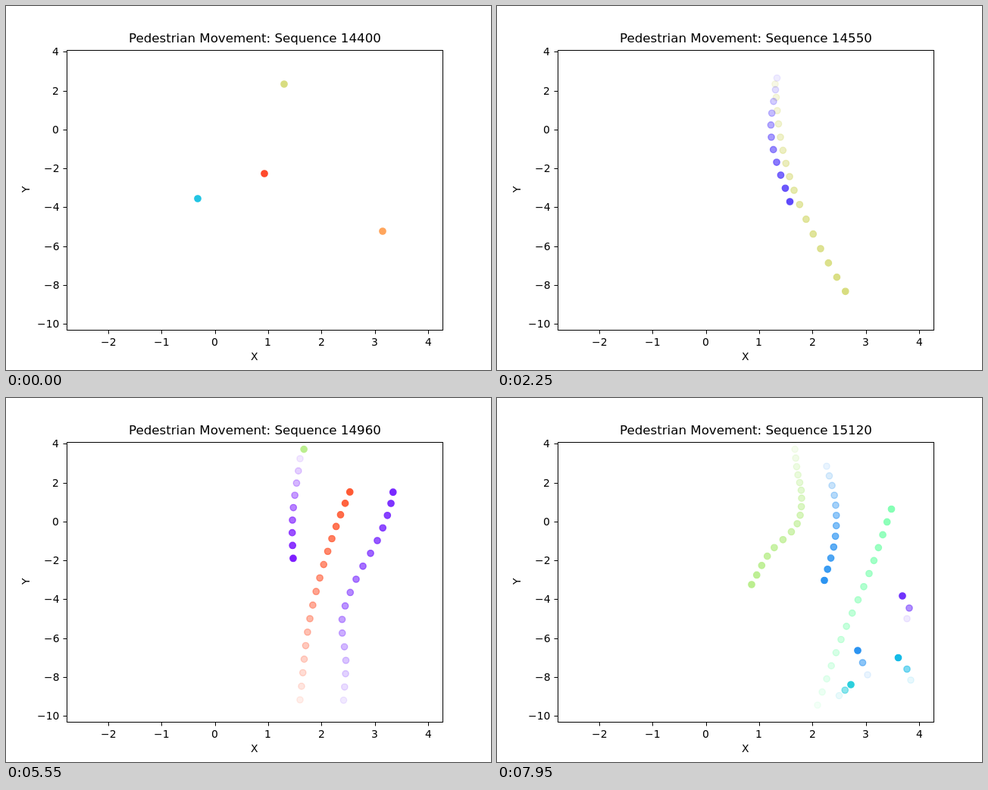
Animation of 640 by 480 pixels, one loop 8000 ms. Source, as an HTML page with a canvas:

```html
<!DOCTYPE html>
<html lang="en">
<head>
<meta charset="utf-8">
<title>Pedestrian Movement</title>
<style>
  html, body { margin: 0; width: 100%; height: 100%; overflow: hidden; background: #fff; }
  canvas { display: block; }
</style>
</head>
<body>
<canvas id="plot" width="640" height="480"></canvas>
<script>
const ctx = document.getElementById('plot').getContext('2d');
const LOOP = 8000, STEP = 150;
const SMALL = 13.89, LARGE = 16.67;
const walks = [];

// Catmull-Rom curve through evenly timed keys, u from 0 to 1.
function curve(keys, u) {
  const end = keys.length - 1;
  const seg = Math.min(Math.floor(u * end), end - 1), t = u * end - seg;
  const at = (i, k) =>
    i < 0 ? 2 * keys[0][k] - keys[1][k] :
    i > end ? 2 * keys[end][k] - keys[end - 1][k] : keys[i][k];
  return [0, 1].map(k => {
    const [a, b, c, d] = [-1, 0, 1, 2].map(j => at(seg + j, k));
    return b + t / 2 * (c - a + t * (2 * a - 5 * b + 4 * c - d + t * (3 * (b - c) + d - a)));
  });
}

// A pedestrian seen from step "start", walking for "steps" more.
function walk(color, start, steps, ...keys) {
  walks.push({ color, start, steps, keys });
}

walk('#22c4e3', 0, 12, [253, 254], [222, 246], [182, 228], [140, 217], [83, 202]);
walk('#ff4a2c', 0, 14, [341, 221], [352, 253], [331.5, 281], [280, 302], [234, 338], [191, 370]);
walk('#ffa55c', 0, 14, [497, 297], [496, 71]);
walk('#d8dd80', 0, 16, [367, 103], [374, 173], [392, 243], [427, 320], [471, 395]);
walk('#5e49fb', 5, 15, [369.5, 95], [362, 173], [386.5, 258], [421, 352]);
walk('#ff5a34', 21, 18, [388, 398], [401, 291], [430, 185.5], [466, 94]);
walk('#7829ff', 21, 18, [445.5, 398.5], [448.5, 346], [443.5, 292], [462, 239],
  [490, 188], [508, 139], [513.5, 96]);
walk('#7e1eff', 29, 20, [388, 80], [378, 161], [380, 246], [377.5, 336], [381, 404]);
walk('#bbee8f', 36, 17, [392, 56], [396, 95], [402, 130], [395, 168], [360, 204], [336, 246]);
walk('#86ffb5', 38, 15, [423, 405], [454, 318.5], [491, 231.5], [520.5, 146.5]);
walk('#2c94f1', 42, 11, [435, 90], [446.5, 137], [446, 187], [432, 240.5]);
walk('#7033fc', 51, 2, [541, 291], [544, 277], [535, 261]);
walk('#2c94f1', 51, 2, [489, 365], [476, 333]);
walk('#15bbe7', 51, 2, [546, 372], [541, 357.5], [529.5, 342.5]);
walk('#2ccfdc', 51, 2, [451.5, 392.5], [467, 378]);

// anchor: 0.5 centres the text on x, 1 ends it there
function text(str, x, y, size, anchor) {
  ctx.font = size + 'px "DejaVu Sans", sans-serif';
  ctx.fillText(str, Math.round(x - anchor * ctx.measureText(str).width), y);
}

const label = v => String(v).replace('-', '\u2212');

function drawAxes(sequence) {
  ctx.fillStyle = ctx.strokeStyle = '#000';
  ctx.lineWidth = 1;
  ctx.strokeRect(80.5, 58.5, 496, 369);
  ctx.beginPath();
  for (let v = -2; v <= 4; v++) {
    const x = 275.5 + 70.36 * v, px = Math.round(x) + 0.5;
    ctx.moveTo(px, 428);
    ctx.lineTo(px, 432.5);
    text(label(v), x, 448, SMALL, 0.5);
  }
  for (let v = -10; v <= 4; v += 2) {
    const y = Math.round(162.9 - 25.64 * v);
    ctx.moveTo(75.5, y + 0.5);
    ctx.lineTo(80, y + 0.5);
    text(label(v), 70, y + 5, SMALL, 1);
  }
  ctx.stroke();
  text('Pedestrian Movement: Sequence ' + sequence, 328, 48, LARGE, 0.5);
  text('X', 328, 467, SMALL, 0.5);
  ctx.save();
  ctx.translate(31, 242);
  ctx.rotate(-Math.PI / 2);
  text('Y', 0, 0, SMALL, 0.5);
  ctx.restore();
}

function drawWalk({ color, start, steps, keys }, step) {
  const age = step - start;
  if (age < 0 || age > steps) return;
  // Those present at the beginning have been around a little longer.
  const past = start === 0 ? 2 : 0;
  ctx.fillStyle = ctx.strokeStyle = color;
  ctx.lineWidth = 1.39;
  for (let i = 0; i <= age; i++) {
    ctx.globalAlpha = 0.1 + 0.9 * (i + past) / Math.max(1, age + past);
    ctx.beginPath();
    ctx.arc(...curve(keys, i / steps), 4.17, 0, 2 * Math.PI);
    ctx.fill();
    ctx.stroke();
  }
}

function draw(time) {
  const step = Math.floor((time % LOOP) / STEP);
  const sequence = 14400 + 10 * step + (step >= 21 ? 190 : 0);
  ctx.fillStyle = '#fff';
  ctx.fillRect(0, 0, 640, 480);
  ctx.save();
  ctx.beginPath();
  ctx.rect(80, 58, 496, 369);
  ctx.clip();
  for (const w of walks) drawWalk(w, step);
  ctx.restore();
  drawAxes(sequence);
}

let origin;
function tick(now) {
  origin ??= now;
  draw(now - origin);
  requestAnimationFrame(tick);
}
draw(0);
requestAnimationFrame(tick);
</script>
</body>
</html>
```
